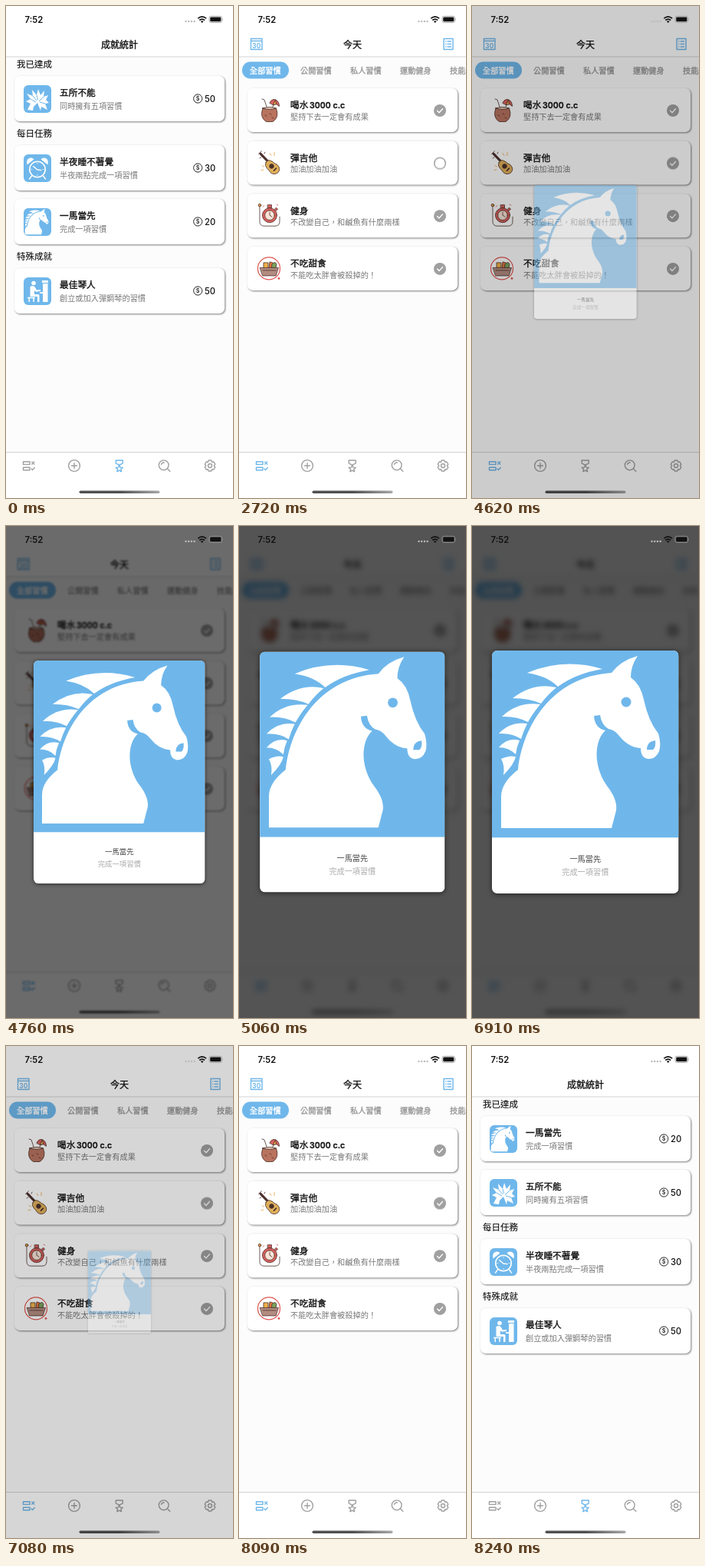
Recreate the animation shown at these times as an HTML page. Size 296 px wide and 640 px high, loop 8270 ms.

```html
<!DOCTYPE html>
<html lang="zh-Hant">
<head>
<meta charset="utf-8">
<title>成就統計</title>
<style>
  html, body { margin: 0; width: 100%; height: 100%; overflow: hidden; background: #fff; }
  .stage { position: relative; width: 296px; height: 640px; overflow: hidden; }
  .stage > * { position: absolute; left: 0; top: 0; width: 296px; height: 640px; }
  .stage > .defs { width: 0; height: 0; }
  svg { display: block; }

  text { font-family: "Noto Sans CJK TC", "Noto Sans CJK", "Noto Sans CJK JP", sans-serif; fill: #111; }
  .head, .name { stroke: #111; stroke-width: .35px; }
  .head { font-size: 12px; text-anchor: middle; }
  .label { font-size: 11.5px; stroke: #111; stroke-width: .12px; }
  .name { font-size: 11.7px; }
  .note { font-size: 10.2px; fill: #777; }
  .chip { font-size: 10.2px; fill: #999; stroke: #999; stroke-width: .35px; }
  .chip.on { fill: #fff; stroke: #fff; }
  .num { font: 500 11.2px Inter, sans-serif; }
  .name .num { font-size: 10.8px; }
  .mid { text-anchor: middle; }
  .card { fill: #fff; filter: drop-shadow(1.2px 1.4px 1.3px rgba(0,0,0,.5)); }
  .line { fill: none; stroke: currentColor; stroke-width: 1.4; stroke-linecap: round; stroke-linejoin: round; }
  .ink { stroke: #4b302c; stroke-width: .8; stroke-linejoin: round; stroke-linecap: round; }
  .blue { color: #6fb7eb; }
  .gray { color: #a0a0a0; }

  .app, .dim, .pop, .first, .home, .last, .done, .todo { animation: 8270ms step-end infinite; }
  .first { animation-name: first; }
  .home { animation-name: home; }
  .last { animation-name: last; }
  .todo { animation-name: todo; }
  .done { animation-name: done; }
  .app { animation-name: blur; }
  .dim { animation-name: dim; background: #000; }
  .pop { animation-name: pop; transform-origin: 148px 320px; }
  .sheet { filter: drop-shadow(0 1px 3px rgba(0,0,0,.6)); }

  @keyframes first { 0% { opacity: 1 } 32.88%, 100% { opacity: 0 } }
  @keyframes home { 0% { opacity: 0 } 32.88% { opacity: 1 } 99.62%, 100% { opacity: 0 } }
  @keyframes last { 0% { opacity: 0 } 99.62%, 100% { opacity: 1 } }
  @keyframes todo { 0% { opacity: 1 } 51.86%, 100% { opacity: 0 } }
  @keyframes done { 0% { opacity: 0 } 51.86%, 100% { opacity: 1 } }

  @keyframes blur {
    0% { filter: none }
    55.85% { filter: blur(.3px); animation-timing-function: steps(2) }
    57.54% { filter: blur(1.3px); animation-timing-function: steps(2) }
    59.35% { filter: blur(2.8px); animation-timing-function: steps(2) }
    61.17% { filter: blur(3.5px); animation-timing-function: steps(4) }
    65.04% { filter: blur(3.7px) }
    84.63% { filter: blur(1.4px) }
    85.6%, 100% { filter: none }
  }
  @keyframes dim {
    0% { opacity: 0 }
    55.85% { opacity: .2; animation-timing-function: steps(2) }
    57.54% { opacity: .58; animation-timing-function: steps(2) }
    59.35% { opacity: .65; animation-timing-function: steps(2) }
    61.17% { opacity: .67; animation-timing-function: steps(4) }
    65.04% { opacity: .675 }
    84.63% { opacity: .46 }
    85.6% { opacity: .16 }
    97.81%, 100% { opacity: 0 }
  }
  @keyframes pop {
    0% { opacity: 0; transform: scale(.4) }
    55.85% { opacity: .5; transform: scale(.55); animation-timing-function: steps(2) }
    57.54% { opacity: 1; transform: scale(.918); animation-timing-function: steps(2) }
    59.35% { opacity: 1; transform: scale(.972); animation-timing-function: steps(2) }
    61.17% { opacity: 1; transform: scale(.991); animation-timing-function: steps(4) }
    65.04% { opacity: 1; transform: scale(1) }
    84.63% { opacity: .85; transform: scale(.76) }
    85.6% { opacity: .36; transform: scale(.34) }
    97.81%, 100% { opacity: 0; transform: scale(.34) }
  }
</style>
</head>
<body>
<div class="stage">

<svg class="defs">
  <defs>
    <symbol id="horse" viewBox="26 162 243.5 243.5">
      <path fill="#6fb7eb" d="M26 162h243.5v243.5H26z"/>
      <g fill="#fff">
        <path d="M38 393V352Q38 334 60 317C66 262 103 196 182 191Q194 175 216 169Q207 182 207 197Q220 206 224 226Q230 254 243 270Q247 284 244 293Q240 303 230 303Q220 302 220 289Q204 288 192 273Q186 265 178 264Q169 259 167 246L159 247Q160 263 174 266C160 278 157 311 176 338Q190 356 188 370L182 393Z"/>
        <path d="M72 191Q120 171 170 186Q135 192 112 209Q98 195 72 191Z"/>
        <path d="M53 224Q80 203 110 210Q98 220 90 231Q75 224 53 224Z"/>
        <path d="M39 248Q60 228 89 232Q79 244 73 255Q58 247 39 248Z"/>
        <path d="M35 270Q50 254 72 257Q67 267 64 277Q52 269 35 270Z"/>
        <path d="M35 288Q47 274 62 279Q58 288 57 297Q48 288 35 288Z"/>
        <path d="M38 303Q48 298 57 300Q55 310 41 324Q43 312 38 303Z"/>
      </g>
      <circle cx="201" cy="229" r="6.5" fill="#6fb7eb"/>
      <path fill="#6fb7eb" d="M239 279Q228 280 228 291H236Q240 288 239 279Z"/>
    </symbol>

    <linearGradient id="shine">
      <stop offset=".5" stop-color="#505050"/><stop offset="1" stop-color="#a8a8a8"/>
    </linearGradient>
    <clipPath id="round"><rect x="23" y="12" width="36" height="36" rx="6"/></clipPath>
    <rect id="tile" x="23" y="12" width="36" height="36" rx="6" fill="#6fb7eb"/>
    <rect id="wide" class="card" x="11" width="274" height="59" rx="7"/>
    <rect id="slim" class="card" x="11" width="274" height="57" rx="7"/>
    <g id="coin">
      <circle cx="250.2" cy="29.5" r="5.6" fill="none" stroke="#222"/>
      <text class="num mid" x="250.2" y="32.2" style="font-size:7.2px">$</text>
    </g>

    <g id="hands">
      <use href="#wide"/><use href="#tile"/>
      <path fill="#fff" transform="translate(23 12)" d="M5 32L9 24 3 21 9 18 4 11 12 14 11 6 17 13 19 5 22 13 27 7 26 15 32 13 29 19 33 23 28 24 31 32 23 28 22 33 18 23 13 28 12 33Z"/>
      <path stroke="#6fb7eb" transform="translate(23 12)" d="M9 18l7 4M12 14l5 6M26 15l-6 6M28 24l-7-2M17 13l1.5 6"/>
      <text class="name" x="70" y="26.4">五所不能</text>
      <text class="note" x="70" y="42.8">同時擁有五項習慣</text>
      <use href="#coin"/><text class="num" x="259" y="33.5">50</text>
    </g>
    <g id="alarm">
      <use href="#wide"/><use href="#tile"/>
      <g transform="translate(23 12)" fill="none" stroke="#fff" stroke-width="1.6" stroke-linecap="round">
        <circle cx="18" cy="19.5" r="10.2"/>
        <path d="M12.5 15.5l5.5 4.5 5 .6M10.5 28l-3 4M25.5 28l3 4" stroke-width="1.4"/>
        <path d="M18 11.5v.8M18 26.7v.8M10 19.5h.8M25.2 19.5h.8" stroke-width=".9"/>
        <path fill="#fff" stroke="none" d="M4.5 13.5Q3 6 8 4.8Q11.5 4 13.5 6.5ZM31.5 13.5Q33 6 28 4.8Q24.5 4 22.5 6.5Z"/>
      </g>
      <text class="name" x="70" y="26.4">半夜睡不著覺</text>
      <text class="note" x="70" y="42.8">半夜兩點完成一項習慣</text>
      <use href="#coin"/><text class="num" x="259" y="33.5">30</text>
    </g>
    <g id="lead">
      <use href="#wide"/>
      <g clip-path="url(#round)"><use href="#horse" x="23" y="12" width="36" height="36"/></g>
      <text class="name" x="70" y="26.4">一馬當先</text>
      <text class="note" x="70" y="42.8">完成一項習慣</text>
      <use href="#coin"/><text class="num" x="259" y="33.5">20</text>
    </g>
    <g id="piano">
      <use href="#wide"/><use href="#tile"/>
      <g transform="translate(23 12)" fill="#fff">
        <circle cx="13" cy="7.5" r="2.8"/>
        <path d="M8.5 12Q13 9.8 15 13L17 16.5 22 16V18L16 18.8 14 17V22H19Q20.5 22 20.5 24V32H18V25H8.5Z"/>
        <path d="M5 25.7h10v1.6h-1.2V32h-1.5v-4.7H8V32H6.5v-4.7H5z"/>
        <path d="M24 4h8v3h-8zM25 8h6.5v24H25v-11h-4v-1.8h4z"/>
      </g>
      <text class="name" x="70" y="26.4">最佳琴人</text>
      <text class="note" x="70" y="42.8">創立或加入彈鋼琴的習慣</text>
      <use href="#coin"/><text class="num" x="259" y="33.5">50</text>
    </g>

    <g id="check">
      <circle cx="262" cy="29" r="8" fill="#a0a0a0"/>
      <path class="line" style="color:#fff" d="M258.5 29.2l2.5 2.5 4.5-5"/>
    </g>

    <g id="frame">
      <path fill="#fcfcfc" d="M0 0h296v640H0z"/>
      <path fill="#fff" d="M0 0h296v66H0zM0 581h296v59H0z"/>
      <path stroke="#d4d4d4" d="M0 66h296M0 580.5h296"/>
      <rect x="95.5" y="630.5" width="105" height="3.6" rx="1.8" fill="url(#shine)"/>
      <g class="line gray">
        <circle cx="89" cy="598" r="7.4"/><path d="M85.5 598h7M89 594.5v7"/>
        <circle cx="205.7" cy="597.3" r="6.4"/><path d="M210.5 602l3.3 3.3M202.5 596.3q1-2.6 3.7-2.6"/>
        <circle cx="266" cy="598" r="2.5"/>
        <path d="M264.2 591h3.6l.8 2.3 2.3-.3 1.9 3.1-1.6 1.9 1.6 1.9-1.9 3.1-2.3-.3-.8 2.3h-3.6l-.8-2.3-2.3.3-1.9-3.1 1.6-1.9-1.6-1.9 1.9-3.1 2.3.3z"/>
      </g>
    </g>
    <g id="list" class="line">
      <rect x="22.5" y="592.8" width="8.5" height="3.6"/><rect x="22.5" y="600.2" width="8.5" height="3.6"/>
      <path d="M33.8 593l3 3M36.8 593l-3 3M33 602l1.5 1.6 2.8-3"/>
    </g>
    <path id="medal" class="line" d="M143.2 591h9v3.8l-4.5 2.4-4.5-2.4zM147.7 597.2l1.3 2.9 3.2.3-2.4 2.1.7 3.2-2.8-1.6-2.8 1.6.7-3.2-2.4-2.1 3.2-.3z"/>
    <g id="award">
      <use href="#frame"/>
      <text class="head" x="148" y="54.6">成就統計</text>
      <use href="#list" class="gray"/><use href="#medal" class="blue"/>
      <text class="label" x="14" y="80.4">我已達成</text>
      <text class="label" x="14" y="330.4">特殊成就</text>
      <use href="#piano" y="341"/>
    </g>
  </defs>
</svg>

<svg class="app" viewBox="0 0 296 640">
  <g class="first">
    <use href="#award"/>
    <text class="label" x="14" y="170.4">每日任務</text>
    <use href="#hands" y="91"/><use href="#alarm" y="181"/><use href="#lead" y="251"/>
  </g>

  <g class="home">
    <use href="#frame"/>
    <use href="#list" class="blue"/><use href="#medal" class="gray"/>
    <text class="head" x="148" y="54.6">今天</text>
    <g class="line blue">
      <path d="M15.5 42.5h14.5v14H15.5zM15.5 45.5h14.5"/>
      <path d="M267 42.5h12v14h-12zM269.5 46h.3M272 46h4.5M269.5 49.5h.3M272 49.5h4.5M269.5 53h.3M272 53h4.5"/>
    </g>
    <text class="num mid" x="22.8" y="54.6" style="font-size:8.3px;font-weight:700;fill:#6fb7eb">30</text>

    <rect x="4" y="72.5" width="61" height="22" rx="11" fill="#6fb7eb"/>
    <text class="chip on" x="14" y="87.5">全部習慣</text>
    <text class="chip" x="80" y="87.5">公開習慣</text>
    <text class="chip" x="145" y="87.5">私人習慣</text>
    <text class="chip" x="210" y="87.5">運動健身</text>
    <text class="chip" x="275" y="87.5">技能學習</text>

    <g transform="translate(0 107)">
      <use href="#slim"/><use href="#check"/>
      <g class="ink">
        <path fill="none" d="M37 27L33 15l-3-1M43 27l4-11"/>
        <path fill="#d9605c" d="M40 19Q42.500 13.500 47.500 14.800Q52.500 17 52.500 23.500L48.500 20.500 44.500 21.500Z"/>
        <path fill="#f1b44c" d="M44.500 21.500L47.500 14.800 48.500 20.500Z"/>
        <path fill="#b9735f" d="M31 26H48.500Q53 38 44 43.500H35.500Q26.500 38 31 26Z"/>
        <path fill="#e9cbb5" d="M31 26q9-3 17.500 0q-9 3-17.500 0z"/>
        <path fill="none" d="M34 35l2 1M40 33l2 1M43 38l2 1"/>
      </g>
      <text class="name" x="67" y="26.4">喝水<tspan class="num" x="92">3000 c.c</tspan></text>
      <text class="note" x="67" y="40.9">堅持下去一定會有成果</text>
    </g>

    <g transform="translate(0 175.6)">
      <use href="#slim"/>
      <circle class="todo" cx="262" cy="29" r="7.3" fill="none" stroke="#a0a0a0" stroke-width="1.5"/>
      <g class="done"><use href="#check"/></g>
      <g class="ink">
        <path stroke-width="3" fill="none" d="M28 16.5L42 31"/>
        <path fill="#e0b05c" d="M35 28Q38 23 43 26.5Q46 29 50 31Q55 36 51 41Q46 45 41 41Q39 38 36.5 35.5Q33 32 35 28Z"/>
        <circle cx="42.5" cy="32.8" r="2.8" fill="#4b302c"/>
        <path d="M45.5 38.5l3-3" stroke-width="1.6"/>
        <path d="M25.5 17l4-4M29 21l-2 1.5M33 16.5l1-2" fill="none"/>
        <path d="M40 16l2 3M46 15v4M30 32l2.5 1.5M29 38l3-.5" stroke="#e9a13b" fill="none"/>
      </g>
      <text class="name" x="67" y="26.4">彈吉他</text>
      <text class="note" x="67" y="40.9">加油加油加油</text>
    </g>

    <g transform="translate(0 244.2)">
      <use href="#slim"/><use href="#check"/>
      <g class="ink">
        <path fill="none" d="M27 17V36Q27 42 33 42H47Q53 42 53 36V30"/>
        <circle cx="27" cy="15" r="1.8" fill="#e9a13b"/>
        <path fill="#d9605c" d="M37.5 14.5h5v4h-5zM46.5 20l2-2 2 2-2 2z"/>
        <circle cx="40" cy="28" r="9.5" fill="#d9605c"/>
        <circle cx="40" cy="28" r="6.3" fill="#f8e3d6"/>
        <path fill="none" d="M40 24v4l3 2"/>
        <path fill="none" stroke="#d9605c" d="M31 17l2-1.5M49 14l2 1"/>
      </g>
      <text class="name" x="67" y="26.4">健身</text>
      <text class="note" x="67" y="40.9">不改變自己，和鹹魚有什麼兩樣</text>
    </g>

    <g transform="translate(0 312.9)">
      <use href="#slim"/><use href="#check"/>
      <circle cx="39" cy="28.5" r="14.5" fill="none" stroke="#e0564f" stroke-width="1.2"/>
      <circle cx="52" cy="41.5" r="1.4" fill="#e0564f"/>
      <g class="ink">
        <path fill="#f1b44c" d="M32 28v-7h6v7z"/>
        <path fill="#e8743f" d="M39 28l1-8 4 1 2 7z"/>
        <path fill="#79a35a" d="M43 23q4-5 6 0l-1 5h-5z"/>
        <path fill="#b48c80" d="M27.5 27.5H51.5L48 38H31Z"/>
        <path fill="none" d="M31 31h17"/>
      </g>
      <text class="name" x="67" y="26.4">不吃甜食</text>
      <text class="note" x="67" y="40.9">不能吃太胖會被殺掉的！</text>
    </g>
  </g>

  <g class="last">
    <use href="#award"/>
    <text class="label" x="14" y="240.4">每日任務</text>
    <use href="#lead" y="91"/><use href="#hands" y="161"/><use href="#alarm" y="251"/>
  </g>
</svg>

<div class="dim"></div>

<svg viewBox="0 0 296 640">
  <text class="num" x="24.5" y="21.5" style="font-size:11.3px;font-weight:600">7:52</text>
  <g fill="#bbb">
    <circle cx="234.5" cy="20" r="1.2"/><circle cx="238.2" cy="20" r="1.2"/>
    <circle cx="241.9" cy="20" r="1.2"/><circle cx="245.6" cy="20" r="1.2"/>
  </g>
  <g fill="none" stroke="#111" stroke-width="1.7">
    <path d="M250.3 16.2q5.4-4.6 10.8 0M252.3 18.5q3.4-2.9 6.8 0"/>
    <path fill="#111" stroke="none" d="M253.9 20q1.8-1.4 3.6 0l-1.8 2z"/>
  </g>
  <rect x="265" y="13.3" width="16.5" height="8.2" rx="2.3" fill="none" stroke="#999" stroke-width=".8"/>
  <rect x="266.2" y="14.5" width="14.1" height="5.8" rx="1.3" fill="#111"/>
  <path fill="#999" d="M282.5 16q1.3 1.4 0 2.8z"/>
</svg>

<svg class="pop" viewBox="0 0 296 640">
  <clipPath id="sheet"><rect x="26" y="162" width="243.5" height="316" rx="7"/></clipPath>
  <g class="sheet">
    <g clip-path="url(#sheet)">
      <path fill="#fff" d="M26 162h243.5v316H26z"/>
      <use href="#horse" x="26" y="162" width="243.5" height="243.5"/>
      <text class="mid" x="147.8" y="437" style="font-size:10.2px;fill:#444">一馬當先</text>
      <text class="mid" x="147.8" y="454.3" style="font-size:10.2px;fill:#aaa">完成一項習慣</text>
    </g>
  </g>
</svg>

</div>
</body>
</html>
```
